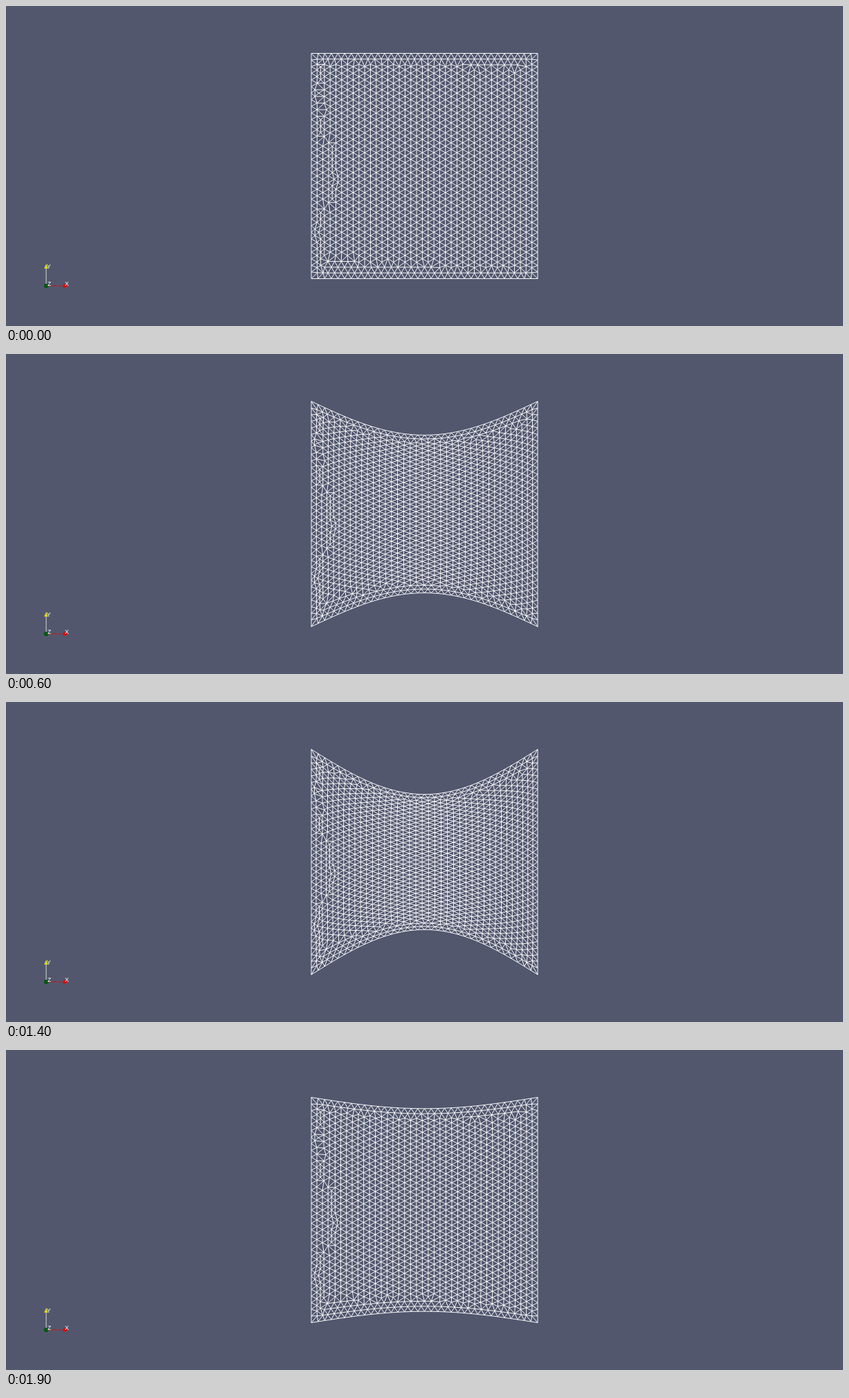
Recreate the animation shown at these times as an HTML page. Size 1209 px wide and 463 px high, loop 2000 ms.

```html
<!DOCTYPE html>
<html lang="en">
<head>
<meta charset="utf-8">
<title>Mesh deformation</title>
<style>
  html, body { margin: 0; height: 100%; overflow: hidden; background: #52576e; }
  svg { display: block; width: 1209px; height: 463px; }
  text { font: 8.5px Arial, "Liberation Sans", sans-serif; fill: #fff; }
</style>
</head>
<body>
<svg viewBox="0 0 1209 463">
  <path id="mesh" fill="none" stroke="#fff" stroke-width="0.95" stroke-linejoin="round"/>
  <path d="M58 405V380" stroke="#d5d5cc"/>
  <path d="M58 405H84" stroke="#c01820"/>
  <path d="M58 373l3 7h-6z" fill="#d8d800"/>
  <path d="M90 405l-7 -3v6z" fill="#e00000"/>
  <circle cx="58" cy="405" r="3.2" fill="#005a10"/>
  <text x="59" y="379.5">Y</text>
  <text x="60" y="405">Z</text>
  <text x="85" y="405">X</text>
</svg>
<script>
const SEGS = 34, COLS = 38;
const side = 1 / SEGS, step = side * Math.sqrt(3) / 2;

// Mesh nodes in the unit square
const nodes = [];
const jitter = (v, n) => v > 0 && v < 1 ? v + 1e-5 * Math.sin(n * n * 7.3 + n) : v;
function add(x, y, gap = 0.57 * side) {
  if (nodes.some(p => Math.hypot(p[0] - x, p[1] - y) < gap)) return;
  const n = nodes.length;
  nodes.push([jitter(x, n + 1), jitter(y, n + 2.5)]);
}

for (let i = 0; i < SEGS; i++) {
  const a = i * side;
  add(a, 0); add(1, a); add(1 - a, 1); add(0, 1 - a);
}
for (const flip of [v => v, v => 1 - v]) {
  add(0.0265, flip(0.0265));
  add(1 - 0.0265, flip(0.0265));
  for (let j = 1; j <= 32; j++) {
    const shift = j === 1 ? 0.0076 : j === 32 ? -0.0076 : 0;
    add((j + 0.5) * side + shift, flip(step));
  }
}
for (let j = 24; j <= 31; j++) add(j * side, 2 * step);
for (let j = 2; j <= 18; j++) add(j * side, 1 - 2 * step);
for (let j = 2; j <= 6; j++) add((j + 0.5) * side, 1 - 3 * step);

// Seam between the lattices grown from the left and right: [first row, column]
const seam = [[3, 1], [10, 0], [15, 1], [16, 2], [19, 1], [26, 2], [27, 3],
  [37, 4], [40, 3], [46, 2], [47, 1], [53, 0], [56, 1]];
const slack = 1 - COLS * step;

function addRow(k) {
  const cut = seam.filter(z => z[0] <= k).pop()[1];
  const y = Math.min(0.951, Math.max(0.049, k * side / 2));
  for (let col = k % 2; col < COLS; col += 2) {
    if (col > 0 && col <= cut) add(col * step, y);
    if (col >= cut) add(col * step + slack, y);
  }
  if ((cut - k) % 2) add(cut * step + slack / 2, y);
}
for (let k = 3; k <= 65; k += 2) addRow(k);
for (let k = 4; k <= 64; k += 2) addRow(k);

// Delaunay triangulation by incremental insertion
function delaunay(pts) {
  const n = pts.length;
  const all = [...pts, [-90, -70], [95, -65], [3, 110]];
  const triangle = (a, b, c) => {
    const [ax, ay] = all[a];
    const bx = all[b][0] - ax, by = all[b][1] - ay;
    const cx = all[c][0] - ax, cy = all[c][1] - ay;
    const d = 2 * (bx * cy - by * cx), bb = bx * bx + by * by, cc = cx * cx + cy * cy;
    const ux = (cy * bb - by * cc) / d, uy = (bx * cc - cx * bb) / d;
    return { v: [a, b, c], x: ax + ux, y: ay + uy, r: ux * ux + uy * uy };
  };
  const edgesOf = ([a, b, c]) => [[a, b], [b, c], [c, a]];
  const key = ([a, b]) => Math.min(a, b) * 10000 + Math.max(a, b);

  let tris = [triangle(n, n + 1, n + 2)];
  for (let i = 0; i < n; i++) {
    const [x, y] = all[i], keep = [], rim = new Map();
    for (const t of tris) {
      if ((x - t.x) ** 2 + (y - t.y) ** 2 >= t.r) { keep.push(t); continue; }
      for (const e of edgesOf(t.v)) {
        const id = key(e);
        if (!rim.delete(id)) rim.set(id, e);
      }
    }
    for (const [a, b] of rim.values()) keep.push(triangle(a, b, i));
    tris = keep;
  }
  const edges = new Map();
  for (const t of tris)
    for (const e of edgesOf(t.v))
      if (e[0] < n && e[1] < n) edges.set(key(e), e);
  return [...edges.values()];
}
const edges = delaunay(nodes);

// Plane elasticity: fixed sides, top and bottom pressed in along a sine
const N = 40, M = N + 1;
const ux = new Float64Array(M * M), uy = new Float64Array(M * M);
for (let i = 0; i <= N; i++) {
  uy[i] = Math.sin(Math.PI * i / N);
  uy[N * M + i] = -uy[i];
}
const STIFF = 3.5, CROSS = 2.5 / 4;
const mixed = (u, p) => CROSS * (u[p + M + 1] - u[p + M - 1] - u[p - M + 1] + u[p - M - 1]);
for (let pass = 0; pass < 1000; pass++)
  for (let j = 1; j < N; j++)
    for (let i = 1; i < N; i++) {
      const p = j * M + i;
      ux[p] = (STIFF * (ux[p - 1] + ux[p + 1]) + ux[p - M] + ux[p + M] + mixed(uy, p)) / (2 * STIFF + 2);
      uy[p] = (uy[p - 1] + uy[p + 1] + STIFF * (uy[p - M] + uy[p + M]) + mixed(ux, p)) / (2 * STIFF + 2);
    }

function sample(u, x, y) {
  const i = Math.min(N - 1, Math.floor(x * N)), j = Math.min(N - 1, Math.floor(y * N));
  const a = x * N - i, b = y * N - j, p = j * M + i;
  return (u[p] * (1 - a) + u[p + 1] * a) * (1 - b) + (u[p + M] * (1 - a) + u[p + M + 1] * a) * b;
}
const moves = nodes.map(([x, y]) => [sample(ux, x, y), sample(uy, x, y)]);

function outline(load) {
  const at = nodes.map(([x, y], i) =>
    (441 + 327 * (x + load * moves[i][0])).toFixed(2) + ' ' +
    (68.5 + 326 * (y + load * moves[i][1])).toFixed(2));
  return edges.map(([a, b]) => 'M' + at[a] + 'L' + at[b]).join('');
}
const poses = [0, 1, 2, 3, 4, 5].map(n => outline(n * 0.05));

const poseAt = t => t < 1400 ? Math.min(5, Math.floor(t / 200))
  : t < 1600 ? 4 : t < 1800 ? 3 : t < 1900 ? 2 : 1;

const mesh = document.getElementById('mesh');
let shown = -1, start;
function draw(now) {
  start ??= now;
  const pose = poseAt((now - start) % 2000);
  if (pose !== shown) mesh.setAttribute('d', poses[shown = pose]);
  requestAnimationFrame(draw);
}
requestAnimationFrame(draw);
</script>
</body>
</html>
```
